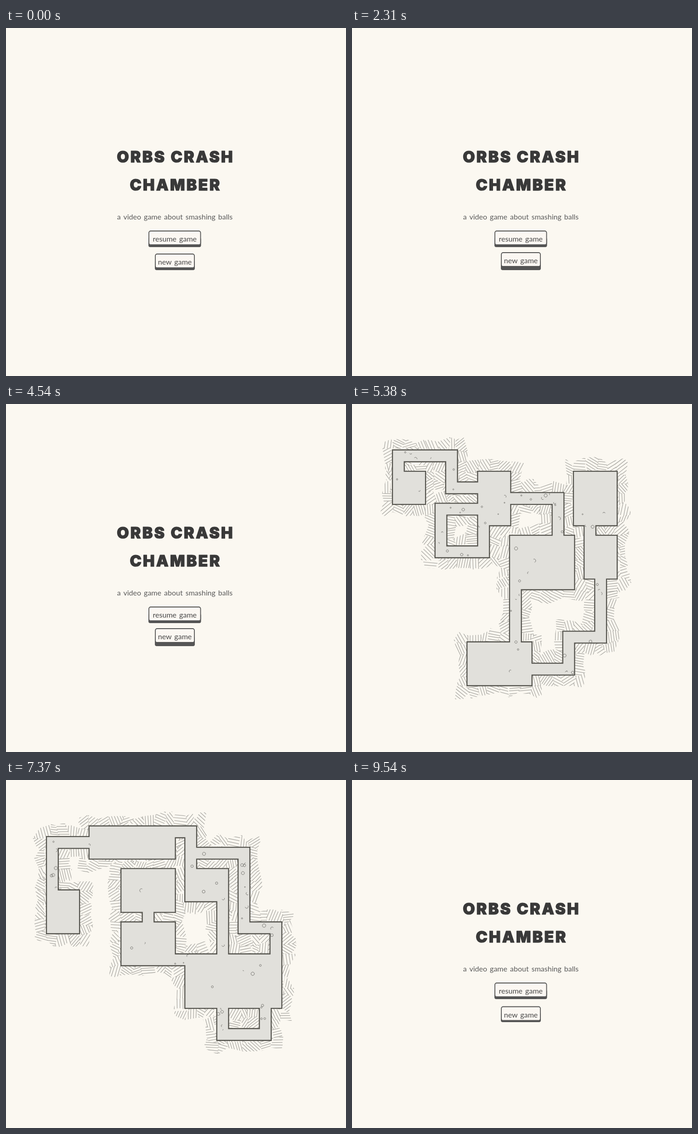
An HTML page with a canvas for the animation above (9.94 s loop, 740 px wide and 756 px high).

```html
<!DOCTYPE html>
<html lang="en">
<head>
<meta charset="utf-8">
<title>Orbs Crash Chamber</title>
<style>
  html, body { margin: 0; width: 100%; height: 100%; overflow: hidden; background: #fbf8f1; }
  svg, canvas { position: absolute; left: 0; top: 0; }
  text { font: 16px Lato, sans-serif; word-spacing: 2px; text-anchor: middle; fill: #484848; }
  .title { font: 900 34px Inter, sans-serif; letter-spacing: 3.2px; word-spacing: 0;
           fill: #393939; stroke: #393939; stroke-width: 1.2; stroke-linejoin: round; }
  .tagline { fill: #5a5a5a; }
  .base { fill: #555; }
  .face { fill: #fbf7f2; stroke: #555; stroke-width: 1.8; }
</style>
</head>
<body>
<svg id="menu" width="740" height="756">
  <text class="title" x="369" y="291.5">ORBS CRASH</text>
  <text class="title" x="369" y="352.5">CHAMBER</text>
  <text class="tagline" x="367.5" y="416">a video game about smashing balls</text>
  <rect class="base" x="310" y="455" width="114.5" height="21" rx="4"/>
  <rect class="face" x="311" y="441" width="112.5" height="30" rx="4"/>
  <text x="367.3" y="464">resume game</text>
  <rect class="base" x="324" y="505" width="87" height="21" rx="4"/>
  <g id="button">
    <rect class="face" x="325" y="491" width="85" height="30" rx="4"/>
    <text x="367.5" y="514">new game</text>
  </g>
</svg>
<script>
const CELL = 23.17, LOOP = 9940;

// Rooms are [left, top, right, bottom] and halls are paths, both through cell centres.
const dungeons = [
  {
    rooms: [[0, 11, 3, 15], [5, 10, 13, 13], [12, 5, 20, 8], [16, 1, 18, 3], [16, 14, 20, 18], [9, 17, 12, 20]],
    halls: 'M3 11H5 M10 10V7H12 M13 5V1H16 M16 3V5 M16 8V12H22V18H20 M7 13V17H9'
  },
  {
    rooms: [[4, 2, 6, 4], [4, 6, 7, 10], [2, 15, 4, 17], [9, 11, 11, 14], [10, 16, 12, 18], [18, 17, 20, 19], [14, 2, 19, 6]],
    halls: 'M4 3H1V0H5V2 M6 3H11V9H7 M4 8H0V22H4V17 M2 8V15 M6 10V12H9 M11 14V16 M4 17H10 M12 18H18 M20 18H22V14H18V8H14V6'
  },
  {
    rooms: [[0, 2, 2, 4], [8, 2, 10, 6], [11, 8, 16, 12], [7, 18, 12, 21], [18, 8, 20, 11], [17, 2, 20, 6]],
    halls: 'M0 2V0H5V3H8 M8 5H4V9H8V6 M10 4H15V8 M11 12V18 M12 20H16V17H19V11 M18 8V6'
  },
  {
    rooms: [[4, 0, 11, 2], [13, 4, 16, 6], [13, 12, 21, 16], [7, 9, 11, 12], [7, 4, 11, 7], [0, 6, 2, 9]],
    halls: 'M11 0H13V4 M13 2H18V9H21V12 M16 6V12 M16 16V19H20V16 M11 12H13 M9 7V9 M4 1H0V6'
  }
];

const timeline = [
  [0, 'rest'], [740, 'hover'], [940, 'press'], [1380, 0],
  [2310, 'hover'], [2810, 'press'], [3230, 1],
  [4540, 'hover'], [4900, 'press'], [5380, 2],
  [6640, 'hover'], [7040, 'press'], [7370, 3],
  [8580, 'hover'], [9540, 'press']
];
const buttonShift = { rest: 0, hover: -3, press: 1.5 };

// Repeatable noise in 0..1
function noise(...keys) {
  const n = Math.sin(keys.reduce((sum, k, i) => sum + k * [12.9898, 78.233, 37.719, 54.11][i], 1)) * 43758.5453;
  return n - Math.floor(n);
}

function drawDungeon({ rooms, halls }, seed) {
  const canvas = document.createElement('canvas');
  canvas.width = 740;
  canvas.height = 756;
  document.body.append(canvas);
  const ctx = canvas.getContext('2d');

  const hallPath = new Path2D(halls);
  const roomPath = new Path2D();
  for (const [x0, y0, x1, y1] of rooms) roomPath.rect(x0, y0, x1 - x0, y1 - y0);
  const floor = new Path2D(roomPath);
  floor.addPath(hallPath);
  ctx.lineCap = 'square';

  // Hit tests run in cell units, before the view transform is set.
  const hits = (path, x, y, width) => {
    ctx.lineWidth = width;
    return ctx.isPointInStroke(path, x, y);
  };
  const hatched = [], debris = [];
  for (let i = -2; i < 25; i++)
    for (let j = -2; j < 25; j++)
      if (hits(floor, i, j, 2.5)) hatched.push([i, j]);
  for (let n = 0; n < 380; n++) {
    const x = noise(seed, n, 1) * 23 - 0.5, y = noise(seed, n, 2) * 23 - 0.5;
    const inRoom = ctx.isPointInPath(roomPath, x, y) && noise(seed, n, 3) < 0.15;
    if (inRoom || hits(hallPath, x, y, 0.85)) debris.push([x, y, n]);
  }

  ctx.translate(100.9, 112.6);
  ctx.scale(CELL, CELL);

  // Each hatched cell is a wobbly quad filled with parallel strokes.
  const wobble = (i, j, axis) => (noise(seed, i, j, axis) - 0.5) * 0.8;
  ctx.strokeStyle = '#a6a5a0';
  for (const [i, j] of hatched) {
    ctx.save();
    ctx.translate(i, j);
    ctx.beginPath();
    for (const [a, b] of [[0, 0], [1, 0], [1, 1], [0, 1]])
      ctx.lineTo((a - 0.5) * 1.06 + wobble(i + a, j + b, 1), (b - 0.5) * 1.06 + wobble(i + a, j + b, 2));
    ctx.clip();
    ctx.rotate(noise(seed, i, j, 3) * Math.PI);
    ctx.lineWidth = 1.25 / CELL;
    ctx.beginPath();
    const gap = 0.22 + noise(seed, i, j, 4) * 0.06;
    for (let k = -4; k <= 4; k++) {
      ctx.moveTo(-0.5 - noise(i, j, k, 5) * 0.2, k * gap);
      ctx.lineTo(0.5 + noise(i, j, k, 6) * 0.2, k * gap + (noise(i, j, k, 7) - 0.5) * 0.08);
    }
    ctx.stroke();
    ctx.restore();
  }

  const paintFloor = (color, width) => {
    ctx.strokeStyle = ctx.fillStyle = color;
    ctx.lineWidth = width / CELL;
    ctx.stroke(floor);
    ctx.fill(roomPath);
  };
  paintFloor('#55544e', 28.1);
  paintFloor('#e1e0db', 23.4);

  ctx.strokeStyle = '#6b6a66';
  ctx.lineWidth = 0.9 / CELL;
  ctx.lineCap = 'butt';
  for (const [x, y, n] of debris) {
    const whole = noise(seed, n, 4) < 0.55;
    const start = noise(seed, n, 5) * 2 * Math.PI;
    const radius = 0.04 + noise(seed, n, 6) * 0.12;
    ctx.beginPath();
    ctx.arc(x, y, radius, start, start + (whole ? 2 * Math.PI : 2 + noise(seed, n, 7) * 1.6));
    ctx.stroke();
  }
  return canvas;
}

const maps = dungeons.map((dungeon, i) => drawDungeon(dungeon, i + 1));
const menu = document.getElementById('menu');
const button = document.getElementById('button');
const show = (element, on) => { element.style.visibility = on ? 'visible' : 'hidden'; };

function render(now) {
  const time = now % LOOP;
  const view = timeline.findLast(([start]) => start <= time)[1];
  const onMenu = view in buttonShift;
  show(menu, onMenu);
  maps.forEach((map, i) => show(map, i === view));
  if (onMenu) button.setAttribute('transform', `translate(0 ${buttonShift[view]})`);
}

const began = performance.now();
function tick() {
  render(performance.now() - began);
  requestAnimationFrame(tick);
}
tick();
</script>
</body>
</html>
```
